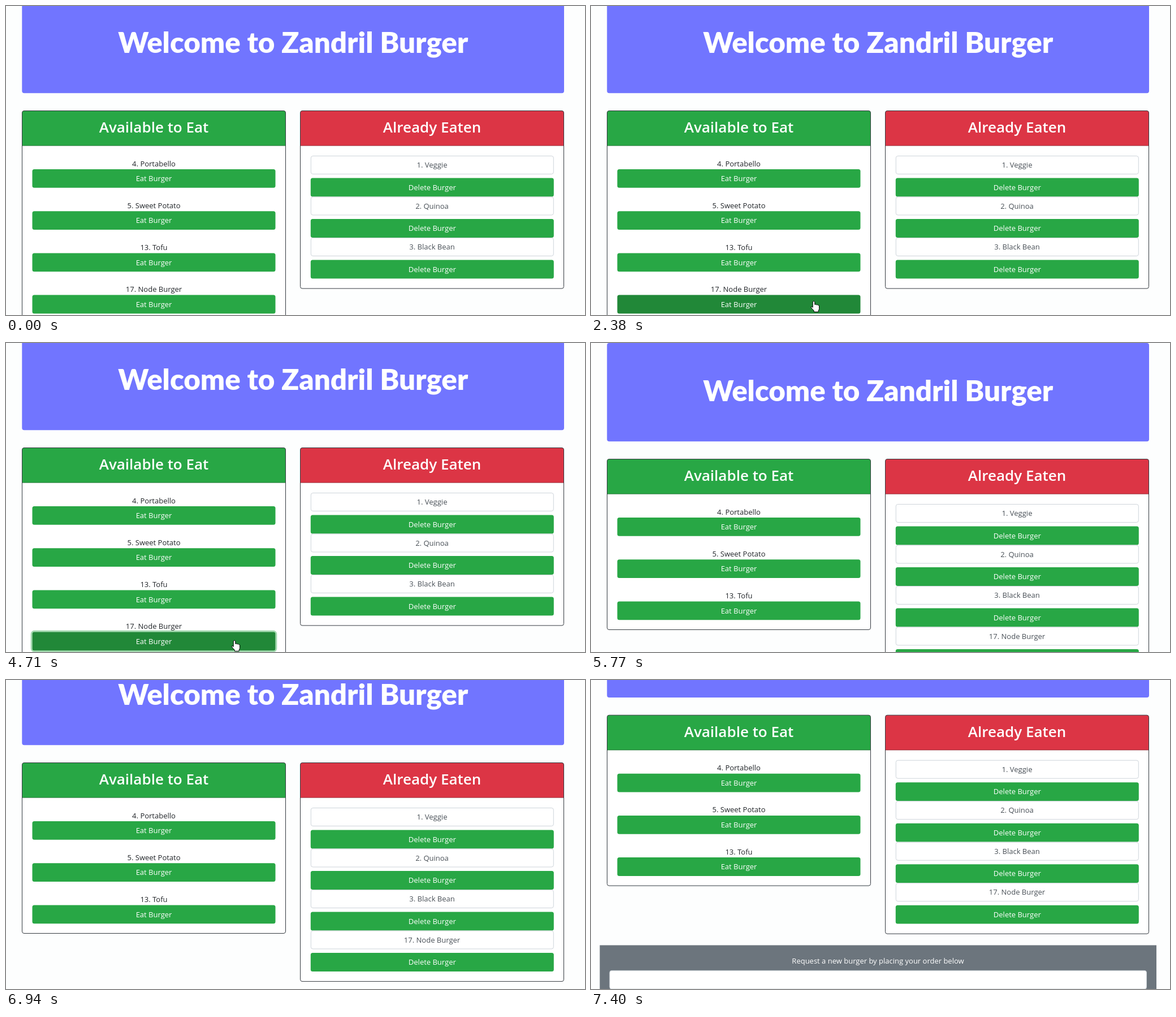
An HTML page for the animation above (8000 ms loop, 1024x547 px).

```html
<!DOCTYPE html>
<html lang="en">
<head>
<meta charset="utf-8">
<title>Burger menu</title>
<style>
  html, body { margin: 0; width: 100%; height: 100%; overflow: hidden; background: #fdfefe; }
  svg { display: block; width: 100vw; height: 100vh; }
  text { font: 13px "Open Sans", "Noto Sans", sans-serif; text-anchor: middle; fill: #212529; }
  .title { font: 900 51px Lato, sans-serif; fill: #fff; }
  .heading { font-size: 26px; font-weight: 600; fill: #fff; }
  .light { fill: #fff; }
  .muted { fill: #495057; }
  .field { fill: #fff; stroke: #ced4da; }
  .frame { fill: none; stroke: #343a40; }
  .pointer { fill: #fff; stroke: #000; stroke-linejoin: round; }
</style>
</head>
<body>
<svg id="stage" viewBox="0 0 1024 547"></svg>
<script>
const LOOP = 8000;
const RELOAD = 5090;
const LEFT = 28.5, RIGHT = 520.5, CARD_W = 466;
const GREEN = '#28a745', RED = '#dc3545';

const rect = (x, y, w, h, attrs) =>
  `<rect x="${x}" y="${y}" width="${w}" height="${h}" ${attrs}/>`;
const label = (x, y, text, cls = '') =>
  `<text x="${x}" y="${y}" class="${cls}">${text}</text>`;

const button = (x, y, text, id = '') =>
  rect(x, y, 430, 32.8, `rx="3.5" fill="${GREEN}" ${id && `id="${id}"`}`) +
  label(x + 215, y + 21.2, text, 'light');

function card(x, bottom, color, heading, rows) {
  const mid = x + CARD_W / 2;
  const height = bottom - 205.5;
  return rect(x, 205.5, CARD_W, height, 'rx="3.5" fill="#fff"') +
    `<path d="M${x} 267.5V209q0-3.5 3.5-3.5h${CARD_W - 7}q3.5 0 3.5 3.5V267.5z" fill="${color}"/>` +
    rect(x, 266.7, CARD_W, 1, 'fill="rgba(0,0,0,.3)"') +
    label(mid, 244, heading, 'heading') + rows +
    rect(x, 205.5, CARD_W, height, 'rx="3.5" class="frame"');
}

function available(items, targetId) {
  const rows = items.map((item, i) => {
    const y = 309 + i * 74.2;
    const id = item.startsWith('17') ? targetId : '';
    return label(261.5, y - 5.4, item) + button(46.5, y, 'Eat Burger', id);
  }).join('');
  return card(LEFT, 284.9 + items.length * 74.2, GREEN, 'Available to Eat', rows);
}

function eaten(items) {
  const rows = items.map((item, i) => {
    const y = 285 + i * 72.5;
    return rect(539.3, y + 0.5, 429, 32, 'rx="3.5" class="field"') +
      label(753.5, y + 21.3, item, 'muted') +
      button(538.8, y + 39.6, 'Delete Burger');
  }).join('');
  return card(RIGHT, 302.6 + items.length * 72.5, RED, 'Already Eaten', rows);
}

const fresh = ['4. Portabello', '5. Sweet Potato', '13. Tofu'];
const done = ['1. Veggie', '2. Quinoa', '3. Black Bean'];
const moved = '17. Node Burger';

document.getElementById('stage').innerHTML = `
  <g id="page">
    ${rect(28.3, 0, 958.7, 174.2, 'rx="4" fill="#7175ff"')}
    ${label(507.7, 103, 'Welcome to Zandril Burger', 'title')}
    <g id="before">
      ${available([...fresh, moved], 'target')}
      ${rect(45.1, 530.2, 432.8, 35.6, 'rx="5" fill="none" stroke="#48b461" stroke-width="2.8" id="ring"')}
      ${eaten(done)}
    </g>
    <g id="after">
      ${available(fresh)}
      ${eaten([...done, moved])}
    </g>
    ${rect(15.5, 612.8, 984.5, 200, 'fill="#6c757d"')}
    ${label(507.5, 645, 'Request a new burger by placing your order below', 'light')}
    ${rect(33, 657.7, 949.5, 32.5, 'rx="3.5" class="field"')}
  </g>
  <path id="arrow" class="pointer" d="M.5 .5V14l3.1-2.9 2.2 5.2 2.2-1-2.2-5H10z"/>
  <path id="hand" class="pointer" d="M-1.8 1.8Q0-1 1.8 1.8V6.5q2-1 3 .5 2-.8 2.6.6 2-.2 2.2 1.4v4.5q0 2-1.5 3.8v2.2H.3v-2.2Q-2.5 15-5 11.2q.2-2.2 3.2.3z"/>`;

const $ = id => document.getElementById(id);
const el = Object.fromEntries(
  ['page', 'before', 'after', 'target', 'ring', 'arrow', 'hand'].map(id => [id, $(id)]));

// Pointer strokes: start, end, number of steps, quadratic curve
const strokes = [
  { start: 590, end: 980, steps: 6, curve: [[950, 521], [850, 520], [770, 510]] },
  { start: 1530, end: 2290, steps: 11, curve: [[767, 513], [600, 530], [397, 522]] },
  { start: 2380, end: 2380, steps: 1, curve: [[394, 522], [394, 522], [394, 522]] },
  { start: 2610, end: 2920, steps: 5, curve: [[395, 520], [398, 510], [402, 506]] },
  { start: 3070, end: 3300, steps: 4, curve: [[403, 509], [404, 518], [404, 526]] },
  { start: 5540, end: 5693, steps: 3, curve: [[480, 505], [700, 450], [908, 425]] },
];
const POINTER_GONE = 5770;

const hover = [[2138, 0], [2290, 1], [2765, 1], [2915, 0], [3147, 0], [3300, 1]];
const ringFade = [[4540, 0], [4700, 1]];
const scroll = [[0, 20], [RELOAD, 0], [6720, 4], [6780, 17.3], [6860, 37], [6940, 59],
  [7010, 79], [7090, 96.7], [7170, 112], [7250, 125], [7320, 136], [7400, 143.3]];

const hold = (keys, t) => keys.filter(key => key[0] <= t).pop()[1];

function ramp(keys, t) {
  const next = keys.findIndex(key => key[0] > t);
  if (next === 0) return keys[0][1];
  if (next < 0) return keys[keys.length - 1][1];
  const [t0, a] = keys[next - 1], [t1, b] = keys[next];
  return a + (b - a) * (t - t0) / (t1 - t0);
}

function pointerAt(t) {
  const stroke = strokes.filter(s => s.start <= t).pop();
  if (!stroke || t >= POINTER_GONE) return null;
  const { start, end, steps, curve: [a, b, c] } = stroke;
  const last = Math.max(1, steps - 1);
  const progress = end > start ? Math.min(1, (t - start) / (end - start)) : 0;
  const s = Math.floor(progress * last + 1e-6) / last;
  const u = s * s * (3 - 2 * s);
  return a.map((v, i) => v * (1 - u) ** 2 + 2 * u * (1 - u) * b[i] + u * u * c[i]);
}

const mix = (from, to, k) =>
  `rgb(${from.map((v, i) => Math.round(v + (to[i] - v) * k))})`;
const show = (node, on) => node.setAttribute('visibility', on ? 'visible' : 'hidden');

function render(t) {
  el.page.setAttribute('transform', `translate(0 ${-hold(scroll, t)})`);
  show(el.before, t < RELOAD);
  show(el.after, t >= RELOAD);
  el.target.setAttribute('fill', mix([40, 167, 69], [33, 136, 56], ramp(hover, t)));
  el.ring.setAttribute('opacity', ramp(ringFade, t) * 0.5);

  const point = pointerAt(t);
  const onButton = (t >= 2138 && t < 2765) || (t >= 3147 && t < 5540);
  show(el.arrow, point && !onButton);
  show(el.hand, point && onButton);
  if (point) {
    for (const node of [el.arrow, el.hand])
      node.setAttribute('transform', `translate(${point})`);
  }
}

const origin = performance.now();
function tick() {
  render((performance.now() - origin) % LOOP);
  requestAnimationFrame(tick);
}
render(0);
requestAnimationFrame(tick);
</script>
</body>
</html>
```
